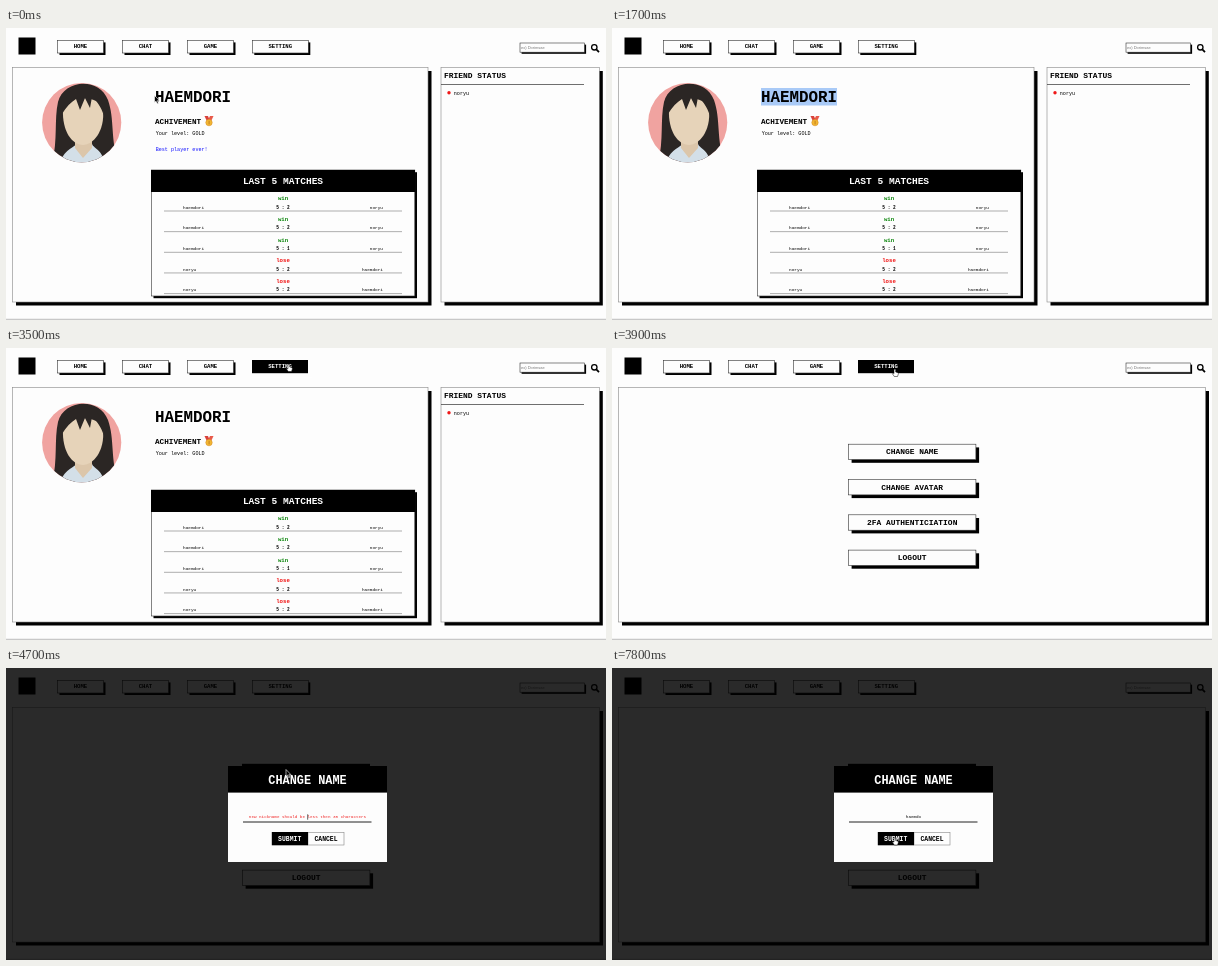
These frames come from a looping animation (600 by 292 pixels, 8000 ms). An HTML page:

```html
<!DOCTYPE html>
<html lang="en">
<head>
<meta charset="utf-8">
<title>Profile and settings</title>
<style>
  html, body { margin: 0; width: 100%; height: 100%; overflow: hidden; background: #fdfdfd; }
  svg { display: block; width: 100%; height: 100%; }
  text { font-family: "Liberation Mono", "Courier New", monospace; white-space: pre; }
</style>
</head>
<body>
<svg id="stage" viewBox="0 0 600 292"></svg>
<script>
const LOOP = 8000, STEP = 100;
const PAPER = '#fdfdfd';
const USER = 'haemdori', FRIEND = 'noryu', NEW_NAME = 'haemdo';
const HINT = 'new nickname should be less then 30 characters';
const INPUT_X = 301.5, INPUT_SIZE = 4.25;

const rect = (x, y, w, h, fill, extra = '') =>
  `<rect x="${x}" y="${y}" width="${w}" height="${h}" fill="${fill}" ${extra}/>`;

const line = (x1, x2, y, color, width = 0.6) =>
  `<path d="M${x1} ${y}H${x2}" stroke="${color}" stroke-width="${width}"/>`;

// y is the middle of the glyphs
const text = (x, y, size, str, { fill = '#000', anchor = 'start', bold = true, extra = '' } = {}) =>
  `<text x="${x}" y="${y + size * 0.31}" font-size="${size}" fill="${fill}" text-anchor="${anchor}" ` +
  `font-weight="${bold ? 700 : 400}" ${extra}>${str}</text>`;

const mid = (x, y, size, str, opts = {}) => text(x, y, size, str, { anchor: 'middle', ...opts });

const box = (x, y, w, h, depth, border = '#333', weight = 0.6) =>
  rect(x + depth, y + depth, w, h, '#000') +
  rect(x, y, w, h, PAPER, `stroke="${border}" stroke-width="${weight}"`);

const panel = (x, w) => box(x, 39.5, w, 234.5, 3.5, '#888');

const button = (x, y, w, h, depth, size, label) =>
  box(x, y, w, h, depth) + mid(x + w / 2, y + h / 2, size, label);

const pressed = (id, x, y, w, h, size, label) =>
  `<g id="${id}">` + rect(x - 1, y - 1, w + 5, h + 5, PAPER) + rect(x, y, w, h, '#000') +
  mid(x + w / 2, y + h / 2, size, label, { fill: '#fff' }) + '</g>';

function header() {
  const tabs = [['HOME', 51.5, 46], ['CHAT', 116.5, 46], ['GAME', 181.5, 46], ['SETTING', 246.3, 56]];
  return rect(12.5, 9.5, 17, 17, '#000') +
    tabs.map(([label, x, w]) => button(x, 12.4, w, 12.6, 2, 5.65, label)).join('') +
    pressed('settingHover', 246, 12, 56, 13.2, 5.65, 'SETTING') +
    box(514, 15, 64.5, 9.2, 1.6) +
    `<text x="515" y="21" font-size="4" fill="#777" style="font-family:'Liberation Sans',sans-serif">ex) Dorimsae</text>` +
    '<circle cx="588.3" cy="19.3" r="2.7" fill="none" stroke="#000" stroke-width="1.3"/>' +
    '<path d="M590.3 21.4L593 24.2" stroke="#000" stroke-width="1.8"/>' +
    line(0, 600, 291.3, '#aaa', 0.8);
}

function avatar() {
  return `<clipPath id="round"><circle cx="75.7" cy="94.6" r="39.6"/></clipPath>
    <g clip-path="url(#round)">
      ${rect(36, 54, 80, 82, '#f0a3a0')}
      <path d="M46 136C52 112 48 92 52 74C57 52 93 48 102 72C109 92 104 112 113 136Z" fill="#2b2624"/>
      <path d="M54 136C57 122 68 120 70 116H86C88 121 96 121 99 136Z" fill="#d3dfe8"/>
      <path d="M69 108H86V120L77 130L69 120Z" fill="#dcc6aa"/>
      <path d="M57 82C58 66 95 66 97 82C99 103 87 117 77 117C66 117 56 103 57 82Z" fill="#e6d3b9"/>
      <path d="M56 86C58 66 66 58 80 58C92 60 98 72 98 88C95 78 90 72 86 69L84 80L79 70L74 82L70 71C65 74 60 79 56 86Z" fill="#2b2624"/>
    </g>`;
}

function medal() {
  return `<path d="M198.5 88H202L204 93L201.5 94.5Z" fill="#d8413a"/>
    <path d="M207.5 88H204L201.5 93L204.5 94.5Z" fill="#e8594a"/>
    <circle cx="203" cy="94.6" r="3.2" fill="#f2b632" stroke="#d8932a" stroke-width=".6"/>
    <path d="M203.1 92.8V96.3" stroke="#b8741c" stroke-width=".8"/>`;
}

function matches() {
  const rows = [[1, 2], [1, 2], [1, 1], [0, 2], [0, 2]];
  return box(145.3, 142, 263.5, 126, 2.2) + rect(145, 142, 264, 22, '#000') +
    mid(277, 153.4, 9.55, 'LAST 5 MATCHES', { fill: '#fff' }) +
    rows.map(([won, low], i) => {
      const y = 183 + i * 20.65;
      const [left, right] = won ? [USER, FRIEND] : [FRIEND, USER];
      return mid(277, y - 12.4, 5.7, won ? 'win' : 'lose', { fill: won ? '#0a850a' : '#f01010' }) +
        mid(277, y - 3.6, 4.45, '5 : ' + low) +
        text(177, y - 3.6, 4.4, left, { bold: false }) +
        text(377, y - 3.6, 4.4, right, { bold: false, anchor: 'end' }) +
        line(158, 396, y, '#777');
    }).join('');
}

function profile() {
  return '<g id="profile">' + panel(6.5, 415.5) + panel(435, 158.3) + avatar() +
    rect(149, 60, 76, 17.5, '#a9caf7', 'id="selection"') +
    text(149, 69.4, 15.85, USER.toUpperCase()) +
    text(149, 93.5, 7.7, 'ACHIVEMENT') + medal() +
    text(149.7, 105, 5.1, 'Your level: GOLD', { bold: false }) +
    text(149.7, 121, 5.1, 'Best player ever!', { bold: false, fill: '#1010ff', extra: 'id="tip"' }) +
    matches() +
    text(438, 48, 7.95, 'FRIEND STATUS') + line(435, 578, 56.5, '#333', 0.7) +
    '<circle cx="443" cy="64.8" r="1.7" fill="#f01818"/>' +
    text(447.8, 65, 5.1, FRIEND, { bold: false }) + '</g>';
}

function settings() {
  const items = ['CHANGE NAME', 'CHANGE AVATAR', '2FA AUTHENTICIATION', 'LOGOUT'];
  return '<g id="settings">' + panel(6.5, 587) +
    items.map((label, i) => button(236.4, 96.2 + i * 35.3, 127.5, 15.4, 3.2, 7.95, label)).join('') +
    pressed('nameHover', 236, 95.8, 128, 16.2, 7.95, items[0]) + '</g>';
}

function dialog() {
  return '<g id="dialog">' + rect(0, 0, 600, 292, '#000', 'opacity=".83"') +
    rect(222, 98, 159, 96, PAPER) + rect(222, 98, 159, 26.6, '#000') +
    mid(301.5, 112, 11.9, 'CHANGE NAME', { fill: '#fff' }) +
    mid(INPUT_X, 149, INPUT_SIZE, '', { bold: false, extra: 'id="field"' }) +
    rect(0, 146.3, 0.6, 5.4, '#000', 'id="caret"') +
    line(237, 365.5, 154, '#222', 1) +
    rect(302, 164.4, 36, 12.6, PAPER, 'stroke="#888" stroke-width=".6"') +
    rect(265.8, 164, 36.2, 13.3, '#000') +
    mid(283.7, 170.6, 6.45, 'SUBMIT', { fill: '#fff' }) +
    mid(320, 170.6, 6.45, 'CANCEL') + '</g>';
}

function cursors() {
  return `<g id="cursor" stroke-linejoin="round">
    <path id="arrow" d="M0 0V7L1.6 5.6L2.7 8.2L3.9 7.7L2.8 5.2H5Z" fill="#000" stroke="#fff" stroke-width=".6"/>
    <path id="hand" d="M-1 -2.5Q0 -3.3 .7 -2.5V0L3 .7Q3.6 1 3.3 2.2L2.5 4.5H-.7L-2.6 1.7Q-2.2 .8 -1 1.6Z" fill="#fff" stroke="#000" stroke-width=".5"/>
    <path id="beam" d="M-1.4 -3.4Q0 -3.4 0 -2.6Q0 -3.4 1.4 -3.4M0 -2.6V2.6M-1.4 3.4Q0 3.4 0 2.6Q0 3.4 1.4 3.4" fill="none" stroke="#222" stroke-width=".7"/>
  </g>`;
}

document.getElementById('stage').innerHTML =
  rect(0, 0, 600, 292, PAPER) + header() + profile() + settings() + dialog() + cursors();

const ui = {};
document.querySelectorAll('#stage [id]').forEach(el => ui[el.id] = el);
const show = (el, on) => el.setAttribute('visibility', on ? 'inherit' : 'hidden');
const toggle = (el, on) => { el.style.display = on ? '' : 'none'; };

// time, x, y
const path = [
  [0, 148.5, 67.5], [200, 148.5, 69], [700, 225.5, 70], [2600, 225.5, 70],
  [3300, 283, 19], [3800, 283, 19], [3900, 283, 24], [4100, 281, 102.5],
  [4200, 281, 102.5], [4400, 280, 101.5], [4900, 280, 101.5], [5700, 298.5, 151],
  [7400, 298.5, 151], [7600, 289, 182], [7800, 283, 172.5]
];
const keyTimes = [6000, 6200, 6500, 6800, 7000, 7100];

function cursorAt(t) {
  const i = path.findIndex(p => p[0] > t);
  if (i < 0) return path[path.length - 1].slice(1);
  const [t0, x0, y0] = path[i - 1], [t1, x1, y1] = path[i];
  const k = (t - t0) / (t1 - t0);
  return [x0 + (x1 - x0) * k, y0 + (y1 - y0) * k];
}

function cursorShape(t, y) {
  if ((t >= 900 && t < 2700) || (t >= 6000 && t < 7500)) return '';
  if (t >= 300 && t < 900) return 'beam';
  if (t >= 3000 && t < 4000 && y < 27) return 'hand';
  if (t >= 4700 && y > 143 && y < 155) return 'beam';
  if (t >= 7500 && y > 163 && y < 178) return 'hand';
  return 'arrow';
}

function render(time) {
  const t = Math.floor(time / STEP) * STEP;
  const [x, y] = cursorAt(t);
  const shape = cursorShape(t, y);

  toggle(ui.profile, t < 3600);
  toggle(ui.settings, t >= 3600);
  toggle(ui.dialog, t >= 4700);
  show(ui.tip, t < 300);
  show(ui.selection, t >= 300 && t < 2200);
  ui.selection.setAttribute('width', Math.max(0, Math.min(76, x - 149)));
  show(ui.settingHover, t >= 3000 && t < 4000 && y < 26);
  show(ui.nameHover, t >= 4100);

  const typed = keyTimes.filter(k => k <= t).length;
  ui.field.textContent = typed ? NEW_NAME.slice(0, typed) : HINT;
  ui.field.setAttribute('fill', typed ? '#000' : '#f02020');
  ui.caret.setAttribute('x', INPUT_X + typed * INPUT_SIZE * 0.3);
  show(ui.caret, typed ? t < 7600 : (t - 4700) % 1000 < 500);

  ui.cursor.setAttribute('transform', `translate(${x} ${y})`);
  for (const name of ['arrow', 'hand', 'beam']) show(ui[name], name === shape);
}

const start = performance.now();
function tick() {
  render((performance.now() - start) % LOOP);
  requestAnimationFrame(tick);
}
tick();
</script>
</body>
</html>
```
